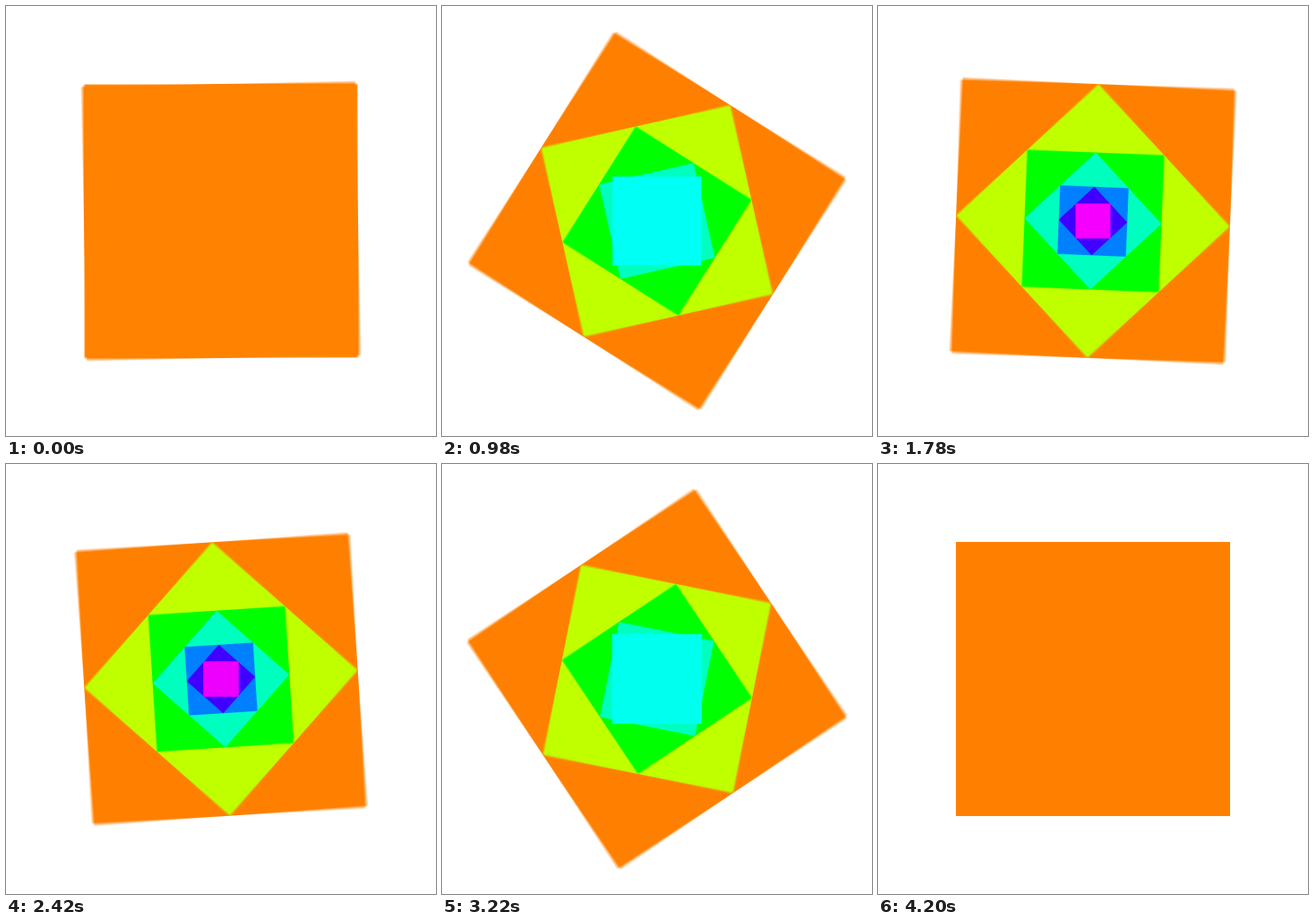
Animation, 480 px wide and 480 px high, one loop 4.22 s. Source, as an HTML page with a canvas:

```html
<!DOCTYPE html>
<html lang="en">
<head>
<meta charset="utf-8">
<title>Nested squares</title>
<style>
  html, body { margin: 0; width: 100%; height: 100%; overflow: hidden; background: #fff; }
  canvas { display: block; }
</style>
</head>
<body>
<canvas id="stage" width="480" height="480"></canvas>
<script>
const SIZE = 480, SIDE = 306;
const STEP = 20, FRAMES = 211;      // ms per step, steps per loop
const TURN = 210, PER_LEVEL = 15;   // steps out and back, steps per new square
const SAMPLES = 4, SHUTTER = 0.6;   // motion blur

const view = document.getElementById('stage').getContext('2d');
const layer = document.createElement('canvas');
layer.width = layer.height = SIZE;
const ctx = layer.getContext('2d');

const sideOf = level => SIDE * Math.SQRT1_2 ** level;

function square(side, level, degrees) {
  ctx.save();
  ctx.translate(SIZE / 2, SIZE / 2);
  ctx.rotate(degrees * Math.PI / 180);
  ctx.fillStyle = `hsl(${30 + 45 * level}, 100%, 50%)`;
  ctx.fillRect(-side / 2, -side / 2, side, side);
  ctx.restore();
}

function drawScene(time) {
  ctx.fillStyle = '#fff';
  ctx.fillRect(0, 0, SIZE, SIZE);

  const level = Math.max(0, Math.min(time, TURN - time) / PER_LEVEL);
  const base = Math.floor(level), part = level - base;
  const angle = time < TURN ? -45 * time / PER_LEVEL : 0;

  for (let i = 0; i <= base; i++) square(sideOf(i), i, angle + 45 * i);

  // The newest square shrinks upright into its place
  const side = sideOf(base) + (sideOf(base + 1) - sideOf(base)) * part;
  square(side, level, 0);
}

function render() {
  const frame = Math.floor(performance.now() / STEP) % FRAMES;
  for (let s = 0; s < SAMPLES; s++) {
    drawScene(frame + SHUTTER * s / SAMPLES);
    view.globalAlpha = 1 / (s + 1);
    view.drawImage(layer, 0, 0);
  }
  requestAnimationFrame(render);
}
render();
</script>
</body>
</html>
```
